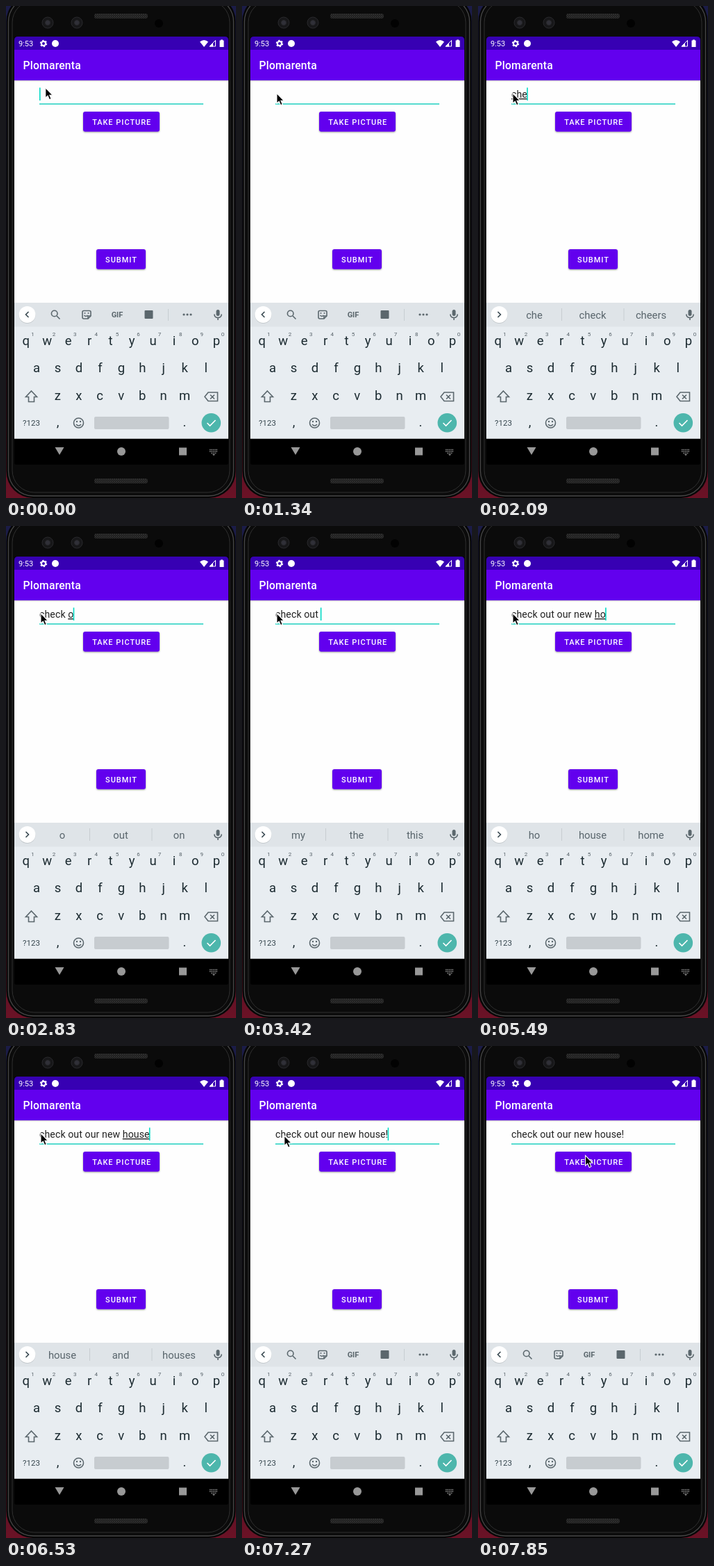
These frames come from a looping animation (331 by 708 pixels, 8000 ms). An HTML page:

```html
<!DOCTYPE html>
<html lang="en">
<head>
<meta charset="utf-8">
<title>Caption entry</title>
<style>
  html, body { margin: 0; width: 100%; height: 100%; overflow: hidden; background: #101018; }
  svg { display: block; width: 331px; height: 708px; font-family: Roboto, "Open Sans", sans-serif; }
  .mid { text-anchor: middle; }
  .btn { font-size: 11px; font-weight: 500; letter-spacing: .98px; fill: #fff; }
  .key { font-size: 18.5px; fill: #1c2b31; }
  .num { font-size: 8px; fill: #566168; }
  .sug { font-size: 14.8px; fill: #59656c; }
  .ico { fill: none; stroke: #5b676d; stroke-width: 1.6; }
  .fill { fill: #5b676d; }
</style>
</head>
<body>
<svg viewBox="0 0 331 708">
  <defs>
    <linearGradient id="desk" x2="0" y2="1">
      <stop offset="0" stop-color="#1b1c48"/>
      <stop offset=".5" stop-color="#15101c"/>
      <stop offset="1" stop-color="#6b1226"/>
    </linearGradient>
    <linearGradient id="shade" x2="0" y2="1">
      <stop offset="0" stop-opacity=".22"/>
      <stop offset="1" stop-opacity="0"/>
    </linearGradient>
    <pattern id="mesh" width="3" height="3" patternUnits="userSpaceOnUse">
      <path d="M0 0L3 3M3 0L0 3" stroke="#343434" stroke-width=".8"/>
    </pattern>
    <filter id="lift" x="-5%" y="-20%" width="110%" height="150%">
      <feDropShadow dx="0" dy="1" stdDeviation=".8" flood-opacity=".4"/>
    </filter>
  </defs>

  <!-- phone -->
  <path fill="url(#desk)" d="M0 0H331V708H0Z"/>
  <rect x=".5" y="-16" width="330" height="724" rx="38" fill="#070707"/>
  <rect x="3.500" y="-13" width="324" height="718" rx="36" fill="#0b0b0b" stroke="#474747" stroke-width="1.300"/>
  <rect x="9" y="-8" width="313" height="708" rx="32" fill="#0b0b0b" stroke="#303030"/>
  <g fill="#1b1b1b">
    <rect x="127" y="11" width="77" height="7" rx="3"/>
    <rect x="127" y="680" width="77" height="7" rx="3"/>
  </g>
  <g fill="url(#mesh)">
    <rect x="127" y="11" width="77" height="7" rx="3"/>
    <rect x="127" y="680" width="77" height="7" rx="3"/>
  </g>
  <g fill="#171719" stroke="#29292c">
    <circle cx="60" cy="24" r="8"/><circle cx="102" cy="24" r="8"/>
    <circle cx="60" cy="24" r="3.5" fill="#303038"/><circle cx="102" cy="24" r="3.5" fill="#303038"/>
  </g>
  <circle cx="220" cy="25" r="6" fill="#020202"/>

  <!-- app -->
  <rect x="12" y="44" width="308" height="616" rx="3"/>
  <path fill="#3700b3" d="M12 63V49Q12 44 17 44H315Q320 44 320 49V63Z"/>
  <path fill="#6200ee" d="M12 63H320V107H12Z"/>
  <path fill="#fefefe" d="M12 107H320V427H12Z"/>
  <path fill="url(#shade)" d="M12 107H320V109H12Z"/>
  <g fill="#fff">
    <text x="18" y="58" font-size="11">9:53</text>
    <circle cx="54" cy="54" r="3" fill="none" stroke="#fff" stroke-width="2"/>
    <circle cx="54" cy="54" r="4.400" fill="none" stroke="#fff" stroke-width="1.600" stroke-dasharray="2.300 2.300"/>
    <circle cx="71" cy="54" r="5"/>
    <path d="M279 51.500Q285 46.500 291 51.500L285 59Z"/>
    <path d="M301.500 49.500V58H293Z" fill="none" stroke="#fff"/>
    <path d="M298 53V58.500H292.500Z"/>
    <path d="M307.500 49.500H309V48.500H312V49.500H313.500V59H307.500Z"/>
    <text x="24.500" y="91" font-size="15.700" font-weight="500" letter-spacing=".2">Plomarenta</text>
  </g>
  <path stroke="#1fcfbf" stroke-width="1.500" d="M48 141H284"/>
  <text x="48" y="132" font-size="14.100" letter-spacing=".1" fill="#222"><tspan id="head"></tspan><tspan id="tail" text-decoration="underline"></tspan></text>
  <rect id="caret" y="117.500" width="1.600" height="18.500" fill="#03dac5"/>
  <g fill="#6200ee" filter="url(#lift)">
    <rect x="111" y="152" width="110" height="28.700" rx="3"/>
    <rect x="130" y="350" width="71" height="28.700" rx="3"/>
  </g>
  <text class="btn mid" x="166.700" y="171">TAKE PICTURE</text>
  <text class="btn mid" x="166" y="369">SUBMIT</text>

  <!-- keyboard -->
  <path fill="#e8edf1" d="M12 427H320V622.700H12Z"/>
  <path fill="#dfe4e8" d="M12 427H320V461.500H12Z"/>
  <circle cx="30.500" cy="444.800" r="12" fill="#b9bfc3"/>
  <circle cx="30.500" cy="444" r="12" fill="#fff"/>
  <path id="chev" fill="none" stroke="#37474f" stroke-width="1.600"/>
  <g id="tools">
    <circle class="ico" cx="69.700" cy="442.500" r="4.300"/>
    <path class="ico" d="M73 446L77.500 450.500"/>
    <path class="ico" d="M112 438.500H120Q122 438.500 122 440.500V446L118 450H112Q110 450 110 448V440.500Q110 438.500 112 438.500ZM118 450V446H122M112.500 445Q115 448 117.500 445"/>
    <circle class="fill" cx="113.500" cy="442" r="1"/><circle class="fill" cx="118.500" cy="442" r="1"/>
    <text class="mid fill" x="160" y="448" font-size="11" font-weight="700">GIF</text>
    <rect class="fill" x="199.500" y="438" width="12" height="12" rx="1"/>
    <path stroke="#c7cdd1" d="M233.500 436V453"/>
    <circle class="fill" cx="256" cy="444" r="1.600"/><circle class="fill" cx="261" cy="444" r="1.600"/><circle class="fill" cx="266" cy="444" r="1.600"/>
  </g>
  <g id="words">
    <text class="sug mid" x="81" y="450"></text>
    <text class="sug mid" x="165" y="450"></text>
    <text class="sug mid" x="249" y="450"></text>
    <path stroke="#c7cdd1" d="M120.500 435V453M210 435V453"/>
  </g>
  <rect class="fill" x="302.500" y="437" width="5" height="9" rx="2.500"/>
  <path class="ico" d="M299.800 443.500Q300 448.500 305 448.500T310.200 443.500M305 448.500V452"/>
  <g id="keys"></g>
  <path class="ico" d="M36.500 554L44.500 562.500H40.500V569.500H32.500V562.500H28.500Z"/>
  <path class="ico" d="M291 556H304.500V568.500H291L286 562.300ZM294 559.500L300 565.500M300 559.500L294 565.500"/>
  <text class="mid" x="36.500" y="604" font-size="11.500" fill="#37474f">?123</text>
  <text class="key mid" x="74.500" y="605">,</text>
  <text class="key mid" x="257" y="605">.</text>
  <circle class="ico" cx="104.500" cy="600" r="7"/>
  <path class="ico" d="M101 602Q104.500 606 108 602"/>
  <circle class="fill" cx="102" cy="598" r="1.200"/><circle class="fill" cx="107" cy="598" r="1.200"/>
  <rect x="127" y="591" width="107.500" height="18" rx="2" fill="#c7ccd0"/>
  <circle cx="295.300" cy="599.700" r="13.800" fill="#4db6ac"/>
  <path fill="none" stroke="#fff" stroke-width="1.600" d="M289.500 600L293.500 604L301.500 596"/>

  <!-- navigation bar -->
  <g fill="#989898">
    <path d="M70.500 635H83.500L77 646Z"/>
    <circle cx="166" cy="641" r="6"/>
    <rect x="249" y="635.500" width="11" height="11"/>
    <path d="M297 645H301L299 647Z"/>
    <path stroke="#989898" stroke-width="1.300" stroke-dasharray="1.400 1" d="M293 638.500H305M293 641H305M295.400 643.500H303"/>
  </g>

  <path id="mouse" stroke="#fff" stroke-width="1.100" d="M0 0V14.500L3.300 11.500L5.700 17L8.300 15.800L6 10.600H10.400Z"/>
</svg>
<script>
const $ = id => document.getElementById(id);
const LOOP = 8000;

// [time, typed text, suggestions]; no suggestions means the tool strip
const steps = [
  [0, "", ""],
  [1790, "c", "c can could"],
  [1940, "ch", "ch check change"],
  [2090, "che", "che check cheers"],
  [2230, "chec", "chec check checking"],
  [2380, "check", "check checked checking"],
  [2680, "check ", "out it in"],
  [2830, "check o", "o out on"],
  [2980, "check ou", "ou out our"],
  [3120, "check out", "out our outside"],
  [3270, "check out ", "out our outside"],
  [3420, "check out ", "my the this"],
  [3870, "check out o", "o our on"],
  [4010, "check out ou", "ou our out"],
  [4310, "check out our", "our ours out"],
  [4460, "check out our ", "our ours out"],
  [4610, "check out our ", "new website house"],
  [4750, "check out our ne", "ne new next"],
  [5050, "check out our new", "new news newest"],
  [5200, "check out our new ", "website house home"],
  [5350, "check out our new h", "h house home"],
  [5490, "check out our new ho", "ho house home"],
  [5780, "check out our new hou", "ho house home"],
  [5930, "check out our new hou", "hou house houses"],
  [6080, "check out our new hous", "hou house houses"],
  [6230, "check out our new hous", "hous house houses"],
  [6380, "check out our new house", "hous house houses"],
  [6530, "check out our new house", "house and houses"],
  [6970, "check out our new house!", "house and houses"],
  [7120, "check out our new house!", ""]
];
const caretOff = [[290, 740], [1340, 1790], [7560, LOOP]];

const label = (cls, x, y, s) => `<text class="${cls} mid" x="${x}" y="${y}">${s}</text>`;
const row = (letters, x, y) => [...letters].map((c, i) => label("key", x + 30.45 * i, y, c)).join("");
$("keys").innerHTML = row("qwertyuiop", 28.8, 488) + row("asdfghjkl", 44.1, 527) + row("zxcvbnm", 74.3, 567) +
  [..."1234567890"].map((c, i) => label("num", 38.5 + 30.4 * i, 475, c)).join("");
const slots = $("words").querySelectorAll("text");

function mouseAt(t) {
  if (t < 590) return [56.8, 117.7];
  if (t < 740) return [53.5, 122];
  if (t < 7260) return [50, 125.7];
  const u = Math.min(5, Math.floor((t - 7260) / 147) + 1) / 5;
  const e = u * u * (3 - 2 * u);
  return [50 + 104.5 * e, 125.7 + 32 * e];
}

let shown;
function show(step) {
  const [, text, hints] = step;
  const word = text.match(/[a-z]*$/)[0];
  $("head").textContent = text.slice(0, text.length - word.length).replace(/ /g, "\u00a0");
  $("tail").textContent = word;
  const width = text ? $("head").parentNode.getComputedTextLength() : 0;
  $("caret").setAttribute("x", 48 + Math.max(0, width - .7));
  $("tools").style.display = hints ? "none" : "";
  $("words").style.display = hints ? "" : "none";
  hints.split(" ").forEach((w, i) => slots[i].textContent = w);
  $("chev").setAttribute("d", hints ? "M28.500 440L32.500 444L28.500 448" : "M32.500 440L28.500 444L32.500 448");
  shown = step;
}

function draw() {
  const t = performance.now() % LOOP;
  const step = steps.findLast(s => s[0] <= t);
  if (step !== shown) show(step);
  $("caret").style.display = caretOff.some(([a, b]) => t >= a && t < b) ? "none" : "";
  $("mouse").setAttribute("transform", `translate(${mouseAt(t)})`);
  requestAnimationFrame(draw);
}
draw();
</script>
</body>
</html>
```
